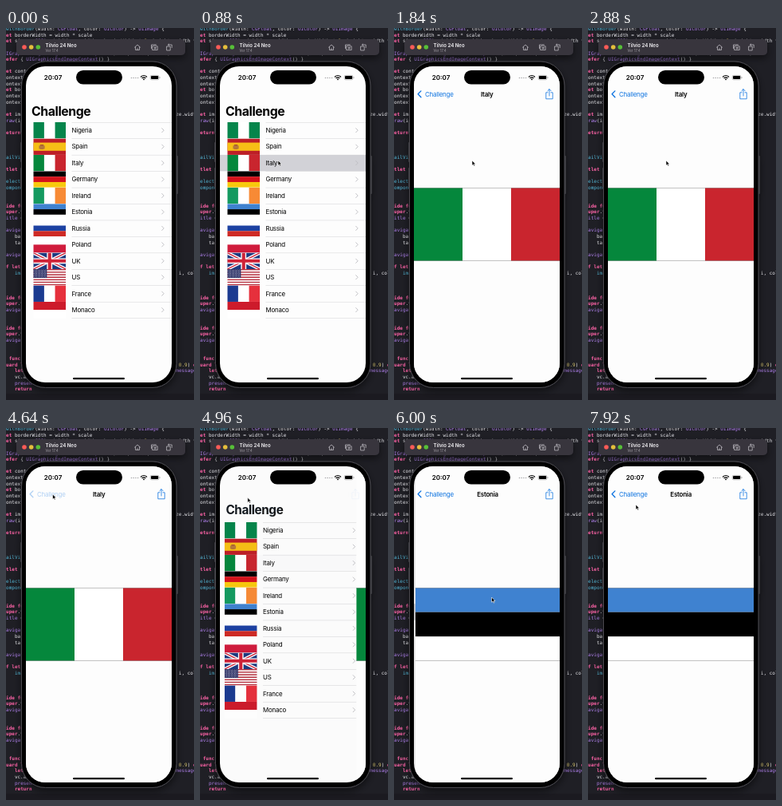
An HTML page that plays this animation: 236 by 466 pixels, repeating every 8 s.

```html
<!DOCTYPE html>
<html lang="en">
<head>
<meta charset="utf-8">
<title>Flag browser</title>
<style>
html, body { margin: 0; width: 100%; height: 100%; overflow: hidden; background: #1f1f25; }
svg { display: block; width: 236px; height: 466px; font-family: Inter, Roboto, sans-serif; }
.code { font: 500 6px "DejaVu Sans Mono", "Liberation Mono", monospace; fill: #ececf0; }
.code .kw { fill: #fa62a5; font-weight: 700; }
.code .ty { fill: #ad7fe8; }
.code .id { fill: #55b9d9; }
.code .nu { fill: #d0bf69; }
.ui { font-size: 7.9px; letter-spacing: -.025em; }
.semi { font-weight: 600; }
.blue { fill: #0f74e0; }
.line { fill: none; stroke-linecap: round; stroke-linejoin: round; }
</style>
</head>
<body>
<svg viewBox="0 0 236 466">
  <defs>
    <clipPath id="screen"><rect x="25" y="48" width="183" height="396" rx="24"/></clipPath>
    <clipPath id="flagBox"><rect width="60" height="30"/></clipPath>
    <filter id="shade" x="-20%" y="-20%" width="140%" height="140%">
      <feDropShadow dx="0" dy="4" stdDeviation="5" flood-color="#000" flood-opacity=".5"/>
    </filter>
  </defs>

  <rect width="236" height="466" fill="#1f1f25"/>
  <g id="code" class="code"></g>
  <rect y="458" width="236" height="8" fill="#1b1a20"/>

  <g filter="url(#shade)">
    <rect x="13" y="14" width="212" height="20" rx="5" fill="#39363d"/>
    <g fill="#3a3a3f">
      <rect x="18" y="118" width="3" height="13" rx="1"/>
      <rect x="18" y="143" width="3" height="25" rx="1"/>
      <rect x="18" y="175" width="3" height="25" rx="1"/>
      <rect x="213" y="160" width="3" height="48" rx="1"/>
    </g>
    <rect x="19.5" y="42" width="194.500" height="408.500" rx="30" fill="#050506" stroke="#4b4a50"/>
  </g>
  <circle cx="23" cy="24" r="2.8" fill="#fc5b57"/>
  <circle cx="31.7" cy="24" r="2.8" fill="#e5bf3c"/>
  <circle cx="40.3" cy="24" r="2.8" fill="#57c038"/>
  <text x="49.5" y="24" font-size="6.1" font-weight="700" fill="#e2e0e4">Tilvio 24 Neo</text>
  <text x="49.5" y="29.6" font-size="4.4" fill="#a09da4">Ver 17.4</text>
  <g class="line" stroke="#b9b6bd" stroke-width=".8">
    <path d="M161.5 24.2L165 21l3.5 3.2M162.5 23.6V27.5h5V23.6M165 27.5v-2"/>
    <path d="M182.5 25.5v-4.500h6M184 22.800h1.200l.7-.9h1.800l.7.9h1.800v4.700h-6.200z"/>
    <circle cx="187" cy="25" r="1.100"/>
    <path d="M202 23h4.200v5H202zM203.500 21h4.700v3.500M204.700 20l-1.200 1 1.200 1"/>
  </g>

  <g clip-path="url(#screen)">
    <rect x="25" y="48" width="184" height="396" fill="#fdfdfd"/>
    <g id="list"></g>
    <rect id="dim" x="25" y="48" width="184" height="396"/>
    <g id="detail">
      <rect x="25" y="48" width="184" height="396" fill="#fdfdfd"/>
      <g id="big"></g>
      <path d="M25 200.500H208M25 291.500H208" stroke="#999" stroke-width=".6"/>
    </g>

    <g id="back">
      <g id="label">
        <text id="large" class="ui" font-weight="700" transform="scale(2)">Challenge</text>
        <text id="small" class="ui blue" transform="scale(2)">Challenge</text>
      </g>
      <path id="arrow" class="line" d="M33.900 78.900L30.100 82.800L33.900 86.700" stroke="#0f74e0" stroke-width="1.350"/>
    </g>
    <text id="title" class="ui semi" y="86" text-anchor="middle"></text>
    <path id="share" class="line" stroke="#0f74e0" stroke-width=".8"
      d="M193 80.800h-2.200v8h8.400v-8H197M195 85v-8.300M192.800 78.800L195 76.600l2.200 2.200"/>

    <text x="47.800" y="64.800" class="semi" font-size="8">20:07</text>
    <rect x="88" y="53" width="58" height="17.500" rx="8.750"/>
    <g fill="#a9a9ab">
      <circle cx="157.500" cy="62.500" r=".8"/><circle cx="160.200" cy="62.500" r=".8"/>
      <circle cx="162.900" cy="62.500" r=".8"/><circle cx="165.600" cy="62.500" r=".8"/>
    </g>
    <path class="line" d="M169.400 61q3.600-3 7.200 0M170.900 62.700q2.100-1.700 4.200 0" stroke="#000" stroke-width="1.200"/>
    <path d="M171.700 64q1.300-.9 2.600 0l-1.300 1.400z"/>
    <rect x="181.200" y="59.300" width="10.800" height="5.600" rx="1.700" fill="none" stroke="#888" stroke-width=".5"/>
    <rect x="182" y="60.100" width="9.200" height="4" rx="1"/>
    <rect x="192.600" y="61.200" width=".8" height="1.800" rx=".4" fill="#888"/>
    <rect x="84" y="438" width="65" height="2.300" rx="1.150"/>
  </g>
  <path id="cursor" d="M0 0V6.200L1.500 4.900L2.500 7.100L3.600 6.600L2.600 4.500H4.500Z"
    stroke="#fff" stroke-width=".6" stroke-linejoin="round"/>
</svg>

<script>
const $ = id => document.getElementById(id);
const clamp = v => Math.max(0, Math.min(1, v));
const rect = (x, y, w, h, fill) => `<rect x="${x}" y="${y}" width="${w}" height="${h}" fill="${fill}"/>`;

// Flags live in a 60 x 30 box.
const columns = cols => cols.map((c, i) => rect(i * 20, 0, 20, 30, c)).join('');
const rows = cols => cols.map((c, i) => rect(0, i * 30 / cols.length, 60, 30 / cols.length, c)).join('');
const cross = (d, c, w) => `<path d="${d}" stroke="${c}" stroke-width="${w}"/>`;

function unionFlag() {
  const diag = 'M0 0L60 30M60 0L0 30', plus = 'M30 0V30M0 15H60';
  return rect(0, 0, 60, 30, '#1d3a80') + cross(diag, '#fff', 6) + cross(diag, '#cf2338', 2) +
    cross(plus, '#fff', 10) + cross(plus, '#cf2338', 6);
}

function starsAndStripes() {
  let s = rows(Array.from({ length: 13 }, (_, i) => i % 2 ? '#fff' : '#b5303f')) + rect(0, 0, 25, 16.2, '#33376b');
  for (let r = 0; r < 9; r++)
    for (let c = r % 2; c < 11; c += 2)
      s += `<circle cx="${2.5 + c * 2}" cy="${1.6 + r * 1.6}" r=".6" fill="#fff"/>`;
  return s;
}

const flags = {
  Nigeria: columns(['#05854b', '#fff', '#05854b']),
  Spain: rect(0, 0, 60, 30, '#bd1f27') + rect(0, 7.5, 60, 15, '#f6bf16') +
    rect(12.5, 11, 6.5, 8.5, '#a9552f') + rect(10.5, 13, 10.5, 6, '#b5783a'),
  Italy: columns(['#05873c', '#fff', '#c9252e']),
  Germany: rows(['#000', '#d5121b', '#f8c90d']),
  Ireland: columns(['#149a60', '#fff', '#f78a35']),
  Estonia: rows(['#3f82d0', '#000', '#fff']),
  Russia: rows(['#fff', '#1d42a2', '#cf2a25']),
  Poland: rows(['#fff', '#d01c3c']),
  UK: unionFlag(),
  US: starsAndStripes(),
  France: columns(['#1b3a90', '#fff', '#e6303c']),
  Monaco: rows(['#cd1b2b', '#fff'])
};
const names = Object.keys(flags);
const flagAt = (name, x, y, w, h) =>
  `<g transform="translate(${x} ${y}) scale(${w / 60} ${h / 30})"><g clip-path="url(#flagBox)">${flags[name]}</g></g>`;

const TOP = 118, ROW = 20.45, WIDTH = 183;
const separator = y => rect(82.5, y, 126, .5, '#d2d2d5');
$('list').innerHTML = '<rect id="pick" x="25" width="260" height="20.45" fill="#d2d2d7"/>' + separator(TOP) +
  names.map((n, i) => {
    const y = TOP + i * ROW;
    return flagAt(n, 34.3, y, ROW * 2, ROW) + `<text class="ui" x="82.5" y="${y + 13}">${n}</text>` +
      `<path class="line" d="M195.7 ${y + 7.6}l2.5 2.6l-2.5 2.6" stroke="#bdbdc1" stroke-width=".9"/>` +
      separator(y + ROW);
  }).join('');

// Editor text by line number; the left edge of the stage cuts the first five columns.
const gap = n => ' '.repeat(n);
const code = {
  0: 'func withBorder(width: CGFloat, color: UIColor) -> UIImage {',
  1: '    let borderWidth = width * scale',
  2: '    let size = CGSize(width: s.width + borderWidth * 2, height: width * 2)',
  4: '    UIGraphicsBeginImageContextWithOptions(size, false, scale)',
  5: '    defer { UIGraphicsEndImageContext() }',
  7: '    let context = UIGraphicsGetCurrentContext()',
  8: '    context.setFill(color)', 9: '    context.fill(rect)',
  10: '    let border = CGRect(origin: .zero, size: size)',
  11: '    context.setStroke(color)', 12: '    context.stroke(border)',
  14: '    let image = CGRect(x: borderWidth, y: borderWidth, width: size.width)',
  15: '    draw(in: image)', 17: '    return result',
  21: '  DetailViewController: UIViewController {',
  23: '@IBOutlet var imageView: UIImageView!',
  25: 'var selectedImage: String?', 26: 'var components: [String]',
  29: 'override func viewDidLoad() {', 30: '    super.viewDidLoad()',
  31: '    title = selectedImage', 33: '    navigationItem.rightBarButtonItem',
  34: '        barButtonSystemItem: .action,', 35: '        target: self',
  37: '    navigationItem.largeTitleDisplayMode', 39: '    if let imageToLoad = selectedImage {',
  40: '        imageView.image = UIImage(named: imageToLoad)?.border(w: i, color: .gray)',
  44: 'override func viewWillAppear() {', 45: '    super.viewWillAppear()',
  46: '    navigationController?.hidesBars = true',
  49: 'override func viewWillDisappear() {', 50: '    super.viewWillDisappear()',
  51: '    navigationController?.hidesBars = false',
  54: '@objc func shareTapped() {',
  55: '    guard let image = imageView.image?.jpegData(quality:' + gap(9) + '0.9) else {',
  56: '        let vc = UIAlertController(title: nil,' + gap(18) + 'message: nil)',
  57: '        vc.addAction(ok)', 58: '        present(vc, animated: true)', 59: '        return'
};
const tokens = new RegExp([
  '(@\\w+|\\b(?:let|var|func|override|super|return|defer|guard|if|else|self|true|false|nil)\\b)',
  '\\b((?:UI|CG)\\w+|String|navigation\\w+|draw|title|present|message)\\b',
  '\\b(withBorder|DetailViewController|selectedImage|components|imageView)\\b',
  '\\b(\\d[\\d.]*)\\b'
].join('|'), 'g');
const paint = s => s.replace(/>/g, '&gt;').replace(tokens, (m, kw, ty, id) =>
  `<tspan class="${kw ? 'kw' : ty ? 'ty' : id ? 'id' : 'nu'}">${m}</tspan>`);
$('code').innerHTML = Object.entries(code).map(([r, s]) =>
  `<text x="-18" y="${2.9 + r * 7.65}">${paint(s.replace(/ /g, '\u00a0'))}</text>`).join('');

// Time, x, y
const path = [
  [80, 242, 200], [760, 98, 166], [3500, 98, 166], [4450, 58.5, 83], [4900, 58.5, 83],
  [5500, 102.5, 228], [5640, 102.5, 228], [5980, 122.5, 212], [7060, 122.5, 212], [7800, 60, 96]
];
function pointer(t) {
  const i = path.findIndex(p => p[0] > t);
  if (i < 0) return path[path.length - 1].slice(1);
  if (i === 0) return path[0].slice(1);
  const a = path[i - 1], b = path[i];
  let u = (t - a[0]) / (b[0] - a[0]);
  u *= u * (3 - 2 * u);
  return [a[1] + (b[1] - a[1]) * u, a[2] + (b[2] - a[2]) * u];
}

function spring(ms) {
  const x = Math.max(0, ms) * .017;
  return 1 - (1 + x) * Math.exp(-x);
}

const LOOP = 8000, PUSH = 917, POP = 4700, PUSH2 = 5610;
const move = (id, x, y, k = 1) => $(id).setAttribute('transform', `translate(${x} ${y}) scale(${k})`);
const fade = (id, v) => $(id).setAttribute('opacity', clamp(v));
let shown;

function show(name) {
  if (name === shown) return;
  shown = name;
  $('title').textContent = name;
  $('big').innerHTML = flagAt(name, 25, 200, WIDTH, 92);
  $('pick').setAttribute('y', TOP + names.indexOf(name) * ROW);
}

function draw(t) {
  const second = t >= PUSH2 - 5, popping = t >= POP && !second;
  const p = second ? spring(t - PUSH2) : popping ? 1 - spring(t - POP) : spring(t - PUSH);
  show(second ? 'Estonia' : 'Italy');

  fade('pick', popping ? p : t >= PUSH - 70 ? 1 : 0);
  move('list', -p * WIDTH * .3, 0);
  fade('dim', p * .1);
  move('detail', (1 - p) * WIDTH, 0);

  move('label', 32 + 7 * p, 110 - 24.4 * p, 1 - p / 2);
  fade('large', 1 - p * 1.3);
  fade('small', p * 1.2);
  fade('arrow', (p - .88) / .1);
  const pressed = clamp((t - 4540) / 60) * clamp((4800 - t) / 100);
  fade('back', 1 - pressed * .68);

  $('title').setAttribute('x', 116.7 + (1 - p) * 82);
  fade('title', p * p * 1.1);
  fade('share', p);
  move('cursor', ...pointer(t));
}

function tick(now) {
  draw(now % LOOP);
  requestAnimationFrame(tick);
}
draw(0);
requestAnimationFrame(tick);
</script>
</body>
</html>
```
